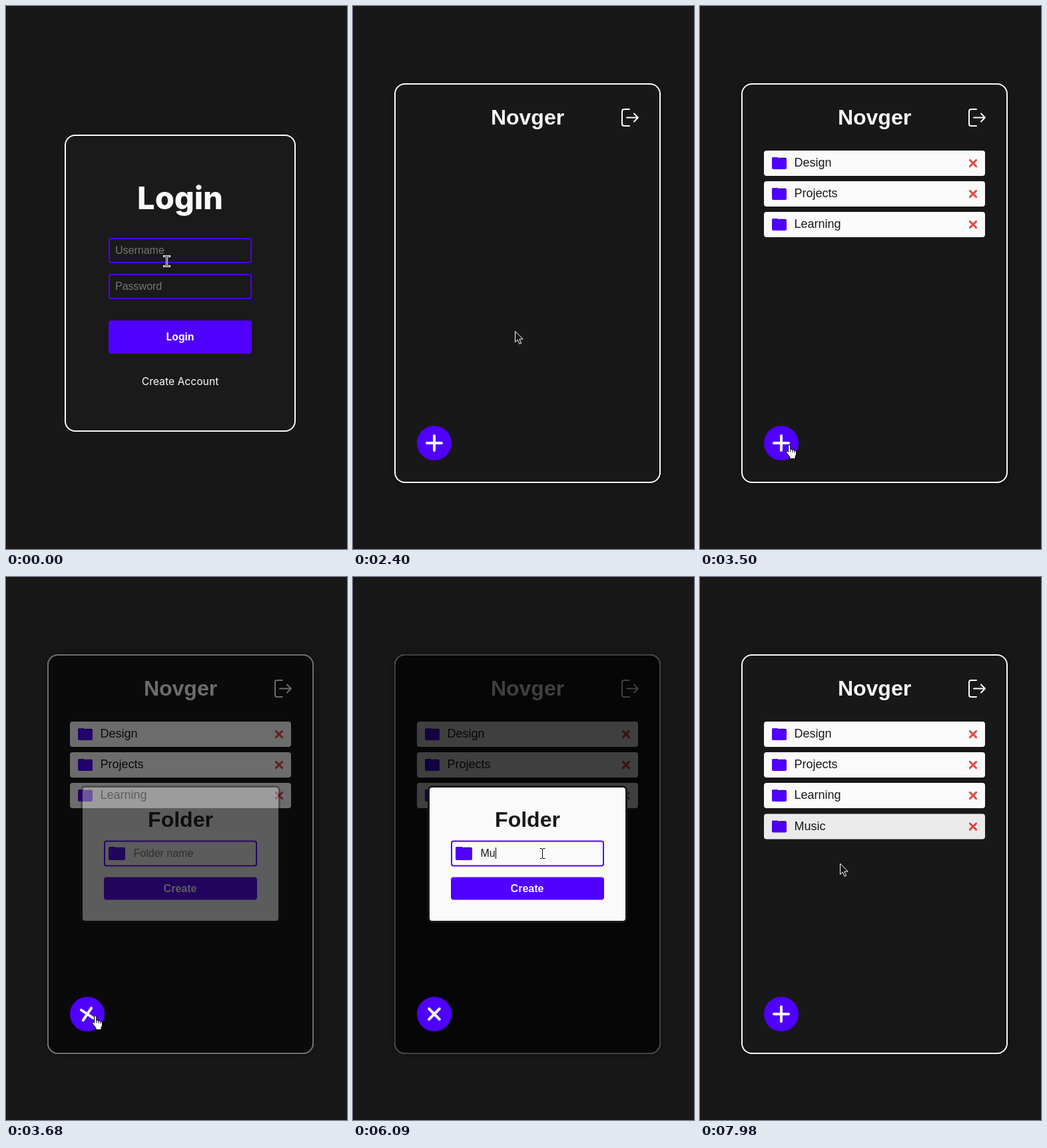
Recreate the animation shown at these times as an HTML page with a canvas. Size 512 by 815 pixels, loop 8000 ms.

```html
<!DOCTYPE html>
<html lang="en">
<head>
<meta charset="utf-8">
<title>Folder vault</title>
<style>
  html, body { margin: 0; width: 100%; height: 100%; overflow: hidden; background: #181818; }
  canvas { display: block; }
</style>
</head>
<body>
<canvas id="stage" width="512" height="815"></canvas>
<script>
const W = 512, H = 815, LOOP = 8000;
const DARK = '#181818', LIGHT = '#fafafa', VIOLET = '#5000ff', EDGE = '#4b00e6', GREY = '#757575', RED = '#e04b47';
const ARIAL = '"Liberation Sans", Arial, sans-serif';
const ROUND = 'Inter, Roboto, sans-serif';
const BRAND = 'Novger', EMAIL = 'nilus@vadem.com';

const LOGIN_END = 2400, OPEN = 3560, CLOSE = 6870, BLUR = 6850;
const ITEMS = [['Design', 2623], ['Projects', 2723], ['Learning', 2823], ['Music', 7706]];
const TYPED = [[5760, 'M'], [6090, 'Mu'], [6220, 'Mus'], [6300, 'Musi'], [6390, 'Music']];

const EASE = {
  in: p => p * p,
  out: p => 1 - (1 - p) ** 2,
  both: p => p * p * (3 - 2 * p),
  cubic: p => p < .5 ? 4 * p ** 3 : 1 - 4 * (1 - p) ** 3
};
const clamp = p => Math.min(1, Math.max(0, p));
const tween = (t, start, span, ease) => EASE[ease](clamp((t - start) / span));

// Pointer path: time, x, y, easing into the point
const PATH = [
  [0, 241, 383], [50, 241, 383], [490, 242, 483, 'both'], [640, 242, 483], [1050, 243, 488, 'both'],
  [2450, 243, 488], [2860, 226, 538, 'in'], [3420, 134, 658, 'out'], [4100, 134, 658],
  [4190, 129, 651, 'both'], [4630, 129, 651], [5120, 284, 415, 'both'], [6440, 284, 415],
  [6700, 214, 455, 'both'], [7150, 214, 455], [7610, 207, 434, 'both'], [7660, 207, 434],
  [7940, 210, 430, 'both'], [LOOP, 210, 430]
];

const canvas = document.getElementById('stage');
const layer = document.createElement('canvas');
layer.width = W;
layer.height = H;
const main = canvas.getContext('2d');
const extra = layer.getContext('2d');
let c = main;

// Draws several shapes as one translucent layer
function group(alpha, draw) {
  if (alpha <= 0) return;
  if (alpha >= 1) return draw();
  c = extra;
  c.clearRect(0, 0, W, H);
  draw();
  c = main;
  c.globalAlpha = alpha;
  c.drawImage(layer, 0, 0);
  c.globalAlpha = 1;
}

function box(x, y, w, h, r, fill) {
  c.beginPath();
  c.roundRect(x, y, w, h, r);
  c.fillStyle = fill;
  c.fill();
}

function framed(x, y, w, h, r, fill, border, line = 2) {
  box(x, y, w, h, r, border);
  box(x + line, y + line, w - 2 * line, h - 2 * line, Math.max(1, r - line), fill);
}

function text(str, x, y, font, color, align = 'left') {
  c.font = font;
  c.fillStyle = color;
  c.textAlign = align;
  c.fillText(str, x, y);
}

function stroke(d, color, width, cap = 'round') {
  c.strokeStyle = color;
  c.lineWidth = width;
  c.lineCap = cap;
  c.lineJoin = 'round';
  c.stroke(new Path2D(d));
}

function at(x, y, draw, angle = 0) {
  c.save();
  c.translate(x, y);
  c.rotate(angle);
  draw();
  c.restore();
}

function folder(x, y, w, h) {
  box(x + w * .45, y + h * .04, w * .54, h * .3, 1.5, '#2a0a80');
  c.fillStyle = VIOLET;
  c.beginPath();
  c.roundRect(x, y, w * .46, h * .5, 1.5);
  c.roundRect(x, y + h * .13, w, h * .87, 2);
  c.fill();
}

function field(y, label, value) {
  framed(154, y, 215, 38, 4, value ? '#e8f0fe' : '#1a1a1a', EDGE);
  text(value || label, 164, y + 24, '16px ' + ARIAL, value ? '#000' : GREY);
}

function loginPage(t) {
  framed(88, 193, 347, 446, 16, '#1a1a1a', LIGHT);
  text('Login', 261.5, 304.5, '800 47px ' + ROUND, LIGHT, 'center');
  field(348, 'Username', t >= 300 && EMAIL);
  field(402, 'Password', t >= 700 && '•'.repeat(10));
  box(154, 472, 215, 50, 4, VIOLET);
  text('Login', 261.5, 502, '700 15.5px ' + ROUND, LIGHT, 'center');
  text('Create Account', 261.5, 569, '400 15.7px ' + ROUND, LIGHT, 'center');
}

function item(name, y) {
  box(96, y, 332, 38, 4, LIGHT);
  folder(108, y + 10, 22, 18);
  text(name, 141.5, y + 24, '18px ' + ARIAL, DARK);
  at(410, y + 19, () => stroke('M-4.6-4.6L4.6 4.6M4.6-4.6L-4.6 4.6', RED, 3));
}

function card() {
  c.save();
  c.shadowColor = 'rgba(0,0,0,.35)';
  c.shadowBlur = 16;
  box(62, 116, 400, 600, 16, LIGHT);
  c.restore();
  box(64, 118, 396, 596, 14, DARK);
  text(BRAND, 262, 178, 'bold 32px ' + ARIAL, LIGHT, 'center');
  stroke('M415 155H407Q404 155 404 158V177Q404 180 407 180H415M411 167.5H428M422 161.5L428 167.5L422 173.5', LIGHT, 2);
}

function modal(t) {
  framed(112, 313, 300, 206, 7, LIGHT, DARK, 3);
  text('Folder', 262, 375, 'bold 32px ' + ARIAL, DARK, 'center');
  framed(147, 395.5, 230, 39, 4, LIGHT, VIOLET);
  folder(154, 405, 25, 20);
  const word = TYPED.reduce((last, [when, s]) => t >= when ? s : last, '');
  text(word || 'Folder name', 191.5, 420, '16px ' + ARIAL, word ? DARK : GREY);
  if (t >= 5580 && t < BLUR) {
    c.fillStyle = '#000';
    c.fillRect(Math.round(191.5 + (word ? c.measureText(word).width : 0)), 406, 1, 17);
  }
  box(147, 450.5, 230, 34, 4, VIOLET);
  text('Create', 261.5, 473, 'bold 16px ' + ARIAL, LIGHT, 'center');
}

function vaultPage(t) {
  card();
  ITEMS.forEach(([name, start], i) => {
    const p = tween(t, start, 370, 'cubic');
    group(p, () => item(name, 217 + 46 * i + 8 * (1 - p)));
  });
  const shade = tween(t, OPEN, 240, 'out') * (1 - tween(t, CLOSE, 400, 'both'));
  if (shade) box(62, 116, 400, 600, 16, `rgba(0,0,0,${.75 * shade})`);
  group(tween(t, OPEN + 50, 375, 'out') * (1 - tween(t, CLOSE, 350, 'both')), () => modal(t));
  box(96, 630, 52, 52, 26, VIOLET);
  at(122, 656, () => stroke('M-11 0H11M0-11V11', LIGHT, 4), shade * Math.PI / 4);
}

const pointers = {
  arrow() {
    const d = 'M.5.5V16.5L4.2 13L7 19.3L9.6 18.2L6.9 12H11.8Z';
    c.fillStyle = DARK;
    c.fill(new Path2D(d));
    stroke(d, '#fff', 1);
  },
  beam() {
    const d = 'M-3.5-7.5H-1L.5-6.5L2-7.5H4.5M.5-6.5V6.5M-3.5 7.5H-1L.5 6.5L2 7.5H4.5';
    stroke(d, '#fff', 3, 'square');
    stroke(d, '#000', 1, 'butt');
  },
  hand() {
    const d = 'M.2.5Q1.8.5 1.8 2.2V7.2Q4.6 6.4 4.9 8.2Q7.6 7.4 8 9.2Q10.6 8.8 10.6 11V15L9 18.5V21.5H1V19L-4 12.6Q-5.2 10-3 9.8L-1.4 11.6V2.2Q-1.4.5.2.5Z';
    c.fillStyle = '#fff';
    c.fill(new Path2D(d));
    stroke(d, '#000', 1);
    stroke('M1.8 7.5V11M4.9 8.5V11.5M8 9.5V12', '#000', 1);
  }
};

function pointerKind(t, x, y) {
  const within = (l, top, r, b) => x >= l && x <= r && y >= top && y <= b;
  if (t < LOGIN_END) {
    if (within(154, 472, 369, 522)) return 'hand';
    return within(154, 348, 369, 386) || within(154, 402, 369, 440) ? 'beam' : 'arrow';
  }
  if (Math.hypot(x - 122, y - 656) < 26) return 'hand';
  if (t > OPEN && t < CLOSE) {
    if (within(147, 396, 377, 434)) return 'beam';
    if (within(147, 450, 377, 485)) return 'hand';
  }
  return 'arrow';
}

function pointer(t) {
  const i = PATH.findIndex(k => k[0] > t);
  const [t0, x0, y0] = PATH[i - 1];
  const [t1, x1, y1, ease = 'both'] = PATH[i];
  const p = tween(t, t0, t1 - t0, ease);
  const x = x0 + (x1 - x0) * p, y = y0 + (y1 - y0) * p;
  at(Math.round(x), Math.round(y), pointers[pointerKind(t, x, y)]);
}

function render(t) {
  c.fillStyle = DARK;
  c.fillRect(0, 0, W, H);
  if (t < LOGIN_END) loginPage(t);
  else vaultPage(t);
  pointer(t);
}

const begin = performance.now();
function tick() {
  render((performance.now() - begin) % LOOP);
  requestAnimationFrame(tick);
}
tick();
</script>
</body>
</html>
```
